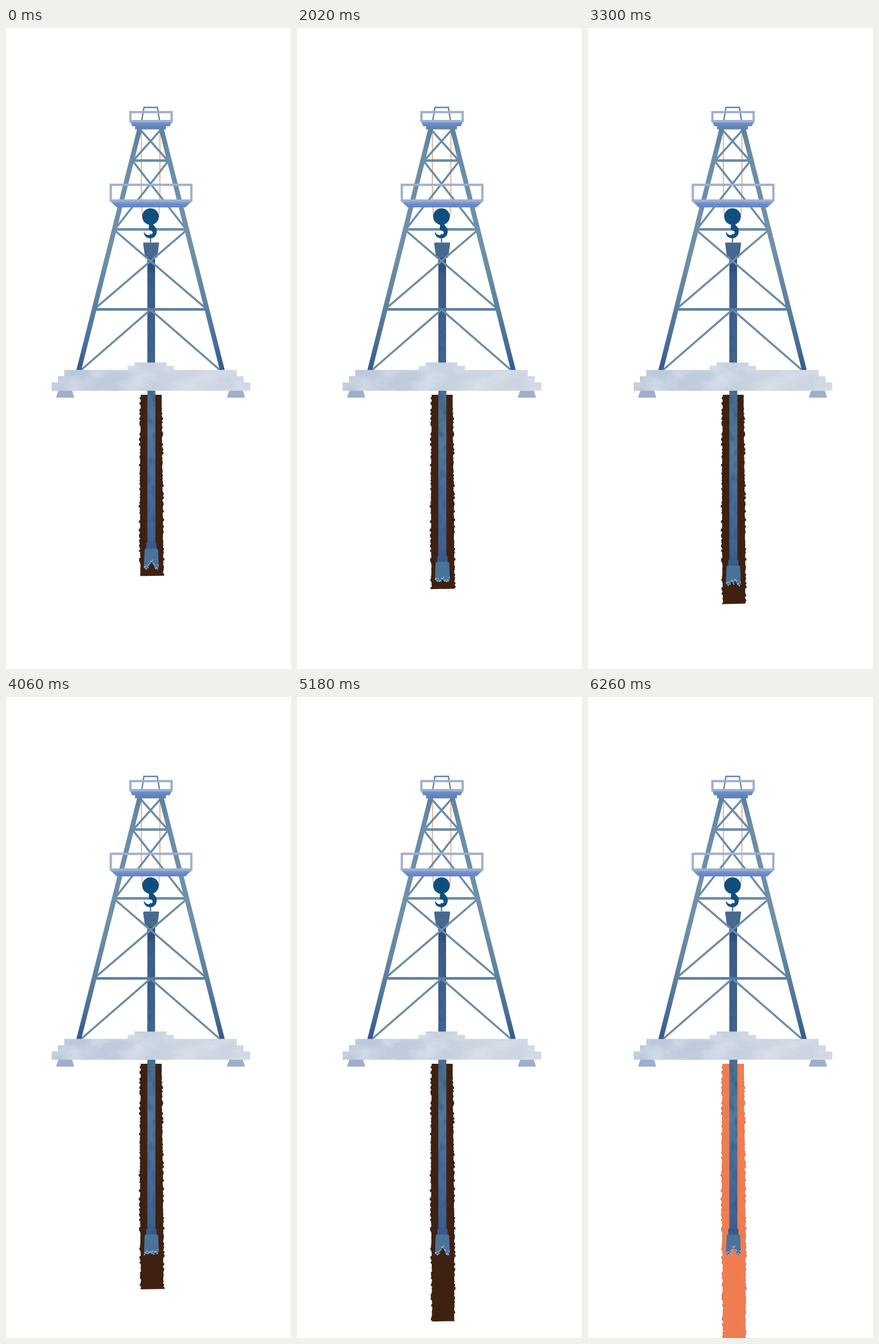
Write an HTML page that moves like this. It is 499x1122 px and loops after 8000 ms.

```html
<!DOCTYPE html>
<html lang="en">
<head>
<meta charset="utf-8">
<title>Drilling rig</title>
<style>
  html, body { margin: 0; width: 100%; height: 100%; overflow: hidden; background: #fff; }
  svg { display: block; width: 100%; height: 100%; }
</style>
</head>
<body>
<svg viewBox="0 0 499 1122" xmlns="http://www.w3.org/2000/svg">
  <defs>
    <linearGradient id="steel" gradientUnits="userSpaceOnUse" x1="0" y1="175" x2="0" y2="600">
      <stop offset="0" stop-color="#5a809e"/>
      <stop offset=".12" stop-color="#6b8da8"/>
      <stop offset=".5" stop-color="#6f90ab"/>
      <stop offset=".75" stop-color="#5b7f9f"/>
      <stop offset=".9" stop-color="#476c98"/>
      <stop offset="1" stop-color="#34598a"/>
    </linearGradient>
    <linearGradient id="deck" x1="0" y1="0" x2="0" y2="1">
      <stop offset="0" stop-color="#8fa6d0"/>
      <stop offset=".5" stop-color="#6b8acd"/>
      <stop offset="1" stop-color="#6085cc"/>
    </linearGradient>
    <linearGradient id="stone" gradientUnits="userSpaceOnUse" x1="80" y1="0" x2="427" y2="0">
      <stop offset="0" stop-color="#b9c7da"/>
      <stop offset=".45" stop-color="#c2cedd"/>
      <stop offset=".7" stop-color="#cfd6e2"/>
      <stop offset="1" stop-color="#ccd3e1"/>
    </linearGradient>
    <linearGradient id="upper" gradientUnits="userSpaceOnUse" x1="0" y1="402" x2="0" y2="586">
      <stop offset="0" stop-color="#2c4c7a"/>
      <stop offset=".12" stop-color="#2f507f"/>
      <stop offset=".16" stop-color="#3d5d88"/>
      <stop offset="1" stop-color="#41658f"/>
    </linearGradient>
    <linearGradient id="lower" gradientUnits="userSpaceOnUse" x1="0" y1="635" x2="0" y2="912">
      <stop offset="0" stop-color="#4a6f8e"/>
      <stop offset=".25" stop-color="#527a9a"/>
      <stop offset=".55" stop-color="#476d98"/>
      <stop offset=".85" stop-color="#426795"/>
      <stop offset="1" stop-color="#375a89"/>
    </linearGradient>
    <filter id="wash" color-interpolation-filters="sRGB">
      <feTurbulence type="fractalNoise" baseFrequency=".02 .04" numOctaves="4" seed="4"/>
      <feColorMatrix values="0 0 0 0 .87  0 0 0 0 .89  0 0 0 0 .93  1.6 0 0 0 -.55"/>
      <feComposite in2="SourceGraphic" operator="in" result="tint"/>
      <feMerge><feMergeNode in="SourceGraphic"/><feMergeNode in="tint"/></feMerge>
    </filter>
    <filter id="grain" color-interpolation-filters="sRGB">
      <feTurbulence type="fractalNoise" baseFrequency=".09 .06" numOctaves="4" seed="9"/>
      <feColorMatrix values="0 0 0 0 .2  0 0 0 0 .33  0 0 0 0 .52  1.5 0 0 0 -.66"/>
      <feComposite in2="SourceGraphic" operator="in" result="tint"/>
      <feMerge><feMergeNode in="SourceGraphic"/><feMergeNode in="tint"/></feMerge>
    </filter>
    <clipPath id="dug"><path id="cut"/></clipPath>
    <path id="wall"/>
  </defs>
  <rect width="499" height="1122" fill="#fff"/>

  <g clip-path="url(#dug)">
    <use href="#wall" fill="#3f2112"/>
    <use id="glow" href="#wall" fill="#f07d52" opacity="0"/>
  </g>

  <g id="drill">
    <path d="M247.5 600H261.5V905H247.5Z" fill="url(#lower)" filter="url(#grain)"/>
    <path d="M245.5 903Q245.5 901 247.5 901H261.5Q263.5 901 263.5 903V913H245.5Z" fill="#365c8e"/>
    <path id="bit" fill="#4a7399"/>
    <path id="sparks" fill="none" stroke="#a9c4e6" stroke-width="2" stroke-linecap="round"/>
  </g>

  <g fill="none" stroke="#dca175" stroke-width="1.5">
    <path d="M237 176V290L239 331"/>
    <path d="M269.5 176V290L267.5 331"/>
  </g>
  <path d="M247.5 400H261V588H247.5Z" fill="url(#upper)" filter="url(#grain)"/>
  <path d="M242 375.5H266.5Q268.5 375.5 268 378L265 400Q264.7 402.5 262 402.5H246Q243.5 402.5 243.2 400L240.2 378Q240 375.5 242 375.5Z" fill="#48698f"/>

  <g fill="none">
    <path id="braces" stroke="#6c8ca9" stroke-width="3.6"/>
    <path d="M221 232H286M190 352.5H316" stroke="#6a8ba8" stroke-width="4.4"/>
    <path d="M155 492.5H352" stroke="#5a7d9f" stroke-width="4.4"/>
    <path d="M234.7 174L127.2 600M271.4 174L379 600" stroke="url(#steel)" stroke-width="8.4"/>
  </g>
  <path d="M226 171.5H280V177.5H226Z" fill="#6285a6"/>
  <path d="M237.5 163L241.5 139H265L269 163" fill="none" stroke="#6483a6" stroke-width="2.4"/>
  <path d="M217 163H291.5L286.5 172H221Z" fill="url(#deck)"/>
  <path d="M182 303H326L314 314H194Z" fill="url(#deck)"/>
  <g fill="none" stroke="#9eb0cc" stroke-width="4">
    <path d="M217.8 147.3H290V163H217.8Z"/>
    <path d="M183.5 274.5H324.5V302H183.5Z"/>
  </g>

  <path d="M253 360V375" stroke="#5b7c9b" stroke-width="2.6"/>
  <g fill="#0f4f80">
    <circle cx="253" cy="330" r="14.5"/>
    <path d="M250.5 343H257L263 350.5C266 360 261 368 252.5 368C246 368 241 363.5 241.5 356.5C244 361 246.5 362.5 250 362.5C256 362.5 258.5 358.5 255.5 355.5L250 353Z"/>
  </g>

  <g fill="#9fafcb">
    <path d="M92 634H115.5L119.5 647H87.5Z"/>
    <path d="M391 634H414.5L418.5 647H386.5Z"/>
  </g>
  <path d="M225 585.5H281V591.5H294V598.5H404V609.5H416V620.5H427.5V635H80V620.5H91V609.5H102V598.5H213V591.5H225Z" fill="url(#stone)" filter="url(#wash)"/>
</svg>
<script>
const LOOP = 8000, STEP = 40, SEGMENT = 21;
const depths = [959, 973.5, 989.5, 1006.5, 1038, 1081, 1122.5];
// Lower edge of the turning bit, left to right, measured from its top.
const rest = [33, 36, 34, 27, 23, 27, 35, 36, 32];
const poses = [
  rest,
  [31, 34, 35, 34, 30, 34, 35, 34, 31],
  [36, 33, 34, 32, 33, 35, 31, 34, 29],
  [31, 35, 33, 27, 33, 26, 33, 36, 32],
  [33, 36, 34, 35, 29, 34, 36, 35, 33]
];

const el = id => document.getElementById(id);
const set = (id, name, value) => el(id).setAttribute(name, value);
const clamp = (v, lo, hi) => Math.min(hi, Math.max(lo, v));

let seed = 7;
function rand() {
  seed = (seed * 16807) % 2147483647;
  return seed / 2147483647;
}

function drawBraces() {
  const lines = [[235, 178, 284, 233], [222, 233, 315, 352], [190, 354, 352, 492.7], [253, 493, 375, 599]];
  set('braces', 'd', lines.map(([x1, y1, x2, y2]) =>
    `M${x1} ${y1}L${x2} ${y2}M${506 - x1} ${y1}L${506 - x2} ${y2}`).join(''));
}

function drawWall() {
  const left = y => 235.2 - 1.1 * Math.sin((y - 680) / 95);
  const right = y => 273 + 2.8 * clamp((y - 660) / 270, 0, 1);
  const a = [], b = [];
  let blobs = '';
  const blob = (x, y, r) =>
    `M${x - r} ${y}a${r} ${r} 0 1 0 ${2 * r} 0a${r} ${r} 0 1 0 ${-2 * r} 0Z`;
  for (let y = 642; y < 1128; y += 3) {
    a.push(`${left(y) + rand() * 0.8} ${y}`);
    b.unshift(`${right(y) - rand() * 0.8} ${y}`);
    if (y < 648) continue;
    if (rand() < 0.5) blobs += blob(left(y) + 1, y, 1 + rand() * 2);
    if (rand() < 0.5) blobs += blob(right(y) - 1, y, 1 + rand() * 2);
  }
  set('wall', 'd', `M${a.join('L')}L${b.join('L')}Z${blobs}`);
}

function drawBit(edge) {
  const points = edge.map((h, i) => [241.5 + 3.25 * i, 912 + h]);
  set('bit', 'd', `M245 911.5H264.5Q266.5 911.5 266.5 914L${points.slice().reverse().join('L')}L242.7 914Q242.7 911.5 245 911.5Z`);
  // Two loose rows of light specks follow the edge.
  set('sparks', 'd', points.slice(0, -1).map(([x, y], i) => {
    const mid = (y + points[i + 1][1]) / 2;
    return `M${x + 0.9} ${y - 1.2}h.1M${x + 2.2} ${mid - 4 - 1.5 * Math.sin(i * 2)}h.1`;
  }).join(''));
}

function render(t) {
  const n = clamp(Math.floor((t - 780) / STEP) + 1, 0, 6 * SEGMENT);
  const i = Math.min(5, Math.floor(n / SEGMENT));
  const bottom = depths[i] + (depths[i + 1] - depths[i]) * (n / SEGMENT - i);
  set('cut', 'd', `M220 635H290V${bottom - 0.6}L220 ${bottom + 0.6}Z`);

  const drop = t < 500 ? 0 : 2 + 27.5 * Math.min(1, n / (2 * SEGMENT));
  set('drill', 'transform', `translate(0 ${drop})`);
  drawBit(n > 0 && n < 5 * SEGMENT ? poses[(n - 1) % 5] : rest);

  set('glow', 'opacity', clamp((Math.floor((t - 5940) / STEP) + 1) / 9, 0, 1));
}

drawBraces();
drawWall();
render(0);
const start = performance.now();
(function tick() {
  render((performance.now() - start) % LOOP);
  requestAnimationFrame(tick);
})();
</script>
</body>
</html>
```
